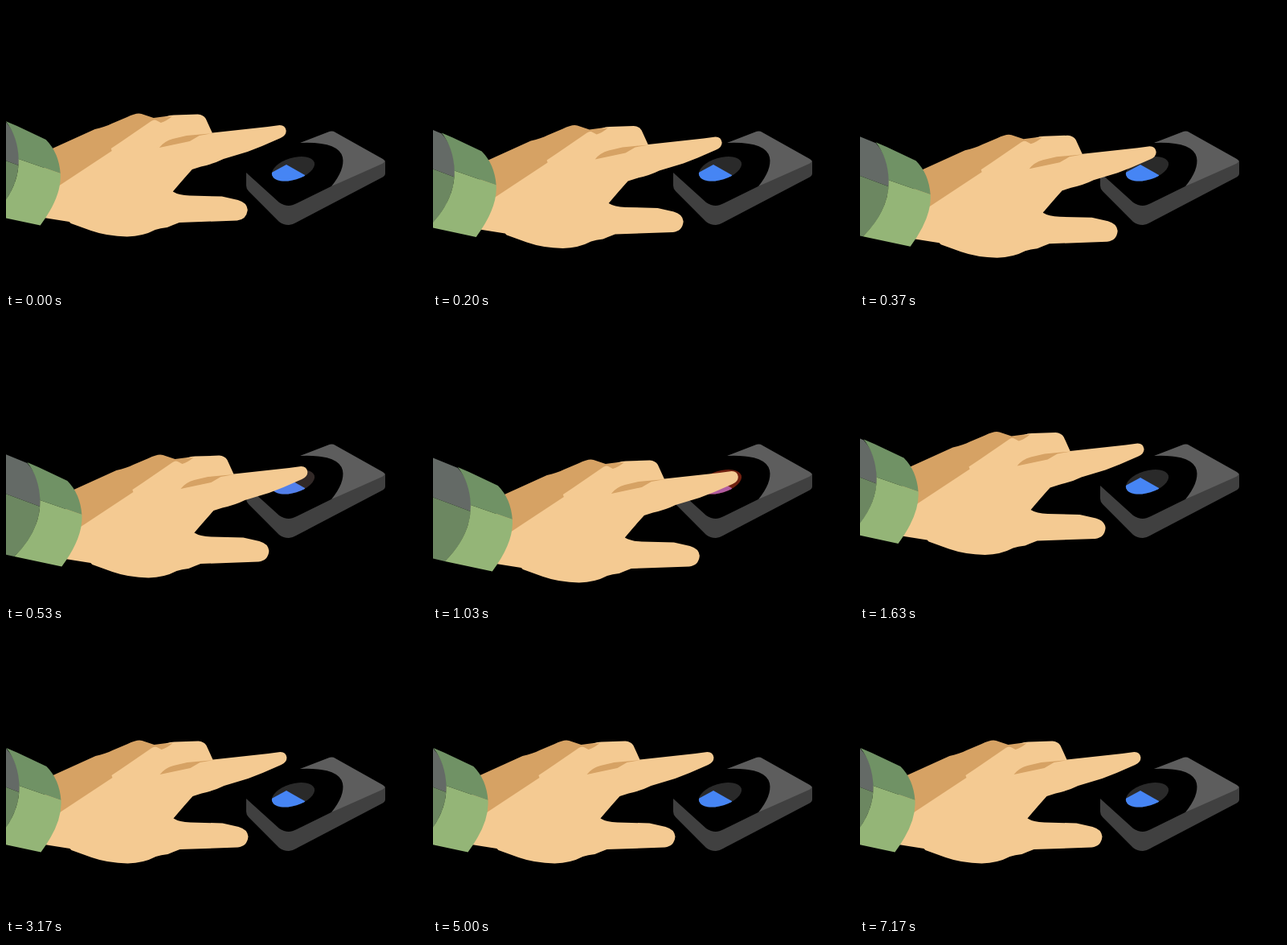
An HTML page that plays this animation: 524 by 354 pixels, repeating every 8000 ms.

```html
<!DOCTYPE html>
<html lang="en">
<head>
<meta charset="utf-8">
<title>Press the button</title>
<style>
  html, body { margin: 0; height: 100%; overflow: hidden; background: #000; }
  svg { display: block; width: 100%; height: 100%; }
</style>
</head>
<body>
<svg viewBox="0 0 524 354">
  <defs>
    <clipPath id="lens"><ellipse cx="357.5" cy="202.3" rx="27.5" ry="13.6" transform="rotate(-17 357.5 202.3)"/></clipPath>
  </defs>

  <g id="device">
    <path fill="#404040" d="M299 207L340 244Q346 248 352 248Q356 248 362 245L468 193L472 192V208Q472 211 468 213L361 269Q356 272 352 272Q345 272 340 268L302 230Q299 227 299 223Z"/>
    <path fill="#5d5d5d" d="M366 170L401 156.500Q406 154.500 410 157L469 190Q474 193 468 196L405 224Q422 203 419 188Q414 168 366 170Z"/>
    <g clip-path="url(#lens)">
      <path id="socket" d="M325 180H390V225H325Z"/>
      <path id="light" d="M349 197L325 210V225H372V210Z"/>
    </g>
  </g>

  <g id="hand">
    <path fill="#d6a264" d="M40 185L57 177L110 153Q123 150 131 146L150 138Q162 132 168 134L183 139L206 136L215 142L150 185L60 232Z"/>
    <path fill="#f4ca92" d="M40 240L68 221.500L131 180L130 177Q136 173 142 169L180 143Q184 140 190 142Q198 136 208 135.500L238 134.500Q245 135 248 140L256 157.500L325 150L340 148Q347 148 348 155Q348 161 341 164L318 174L300 181L270 190Q258 196 242 199.500L231 203Q221 214 207 230.500Q214 235 228 235.500L268 236.500L288 241Q299 244 300 253Q299 265 287 266.500L215 269Q207 272 200 275Q191 276 185 278Q170 286 150 286.500Q125 286 105 279L80 270L78 268L40 262Z"/>
    <path fill="#d6a264" d="M181 140L206 137Q199 143 192 145Q185 141 181 140ZM190 176Q196 168 207 165L224 161L257 158L240 161L228 168Z"/>
    <path fill="#646a66" d="M-60 120L-1 144Q18 165 15 198L-60 170Z"/>
    <path fill="#6c8761" d="M-60 170L15 198Q12 232 -17 260L-60 250Z"/>
    <path fill="#709265" d="M-1 143L13 149L49 166Q65 182 67 208L15 190Q14 162 -1 143Z"/>
    <path fill="#94b577" d="M15 190L67 208Q69 236 42 272.500L-17 260Q16 227 15 190Z"/>
  </g>
</svg>
<script>
  const LOOP = 8000, PEAK = 864, RATE = 0.001853, DEPTH = 43;
  const [hand, socket, light] = ["hand", "socket", "light"].map(id => document.getElementById(id));
  const clamp = v => Math.min(1, Math.max(0, v));
  const mix = (a, b, k) => `rgb(${a.map((v, i) => Math.round(v + (b[i] - v) * k))})`;

  // One swing down and back, then a short settle just below the start pose.
  function drop(t) {
    if (t < 1670) return Math.max(0, DEPTH * Math.cos((t - PEAK) * RATE));
    return 1 + 2.3 * Math.exp(-(t - 1670) / 130);
  }

  function draw(now) {
    const y = drop(now % LOOP);
    const pressed = clamp((y / DEPTH - 0.8) / 0.14);
    hand.setAttribute("transform", `translate(${0.7 + y * 0.76} ${y})`);
    socket.setAttribute("fill", mix([42, 42, 42], [112, 32, 16], pressed));
    light.setAttribute("fill", mix([70, 133, 244], [176, 92, 160], pressed));
    requestAnimationFrame(draw);
  }
  draw(0);
</script>
</body>
</html>
```
